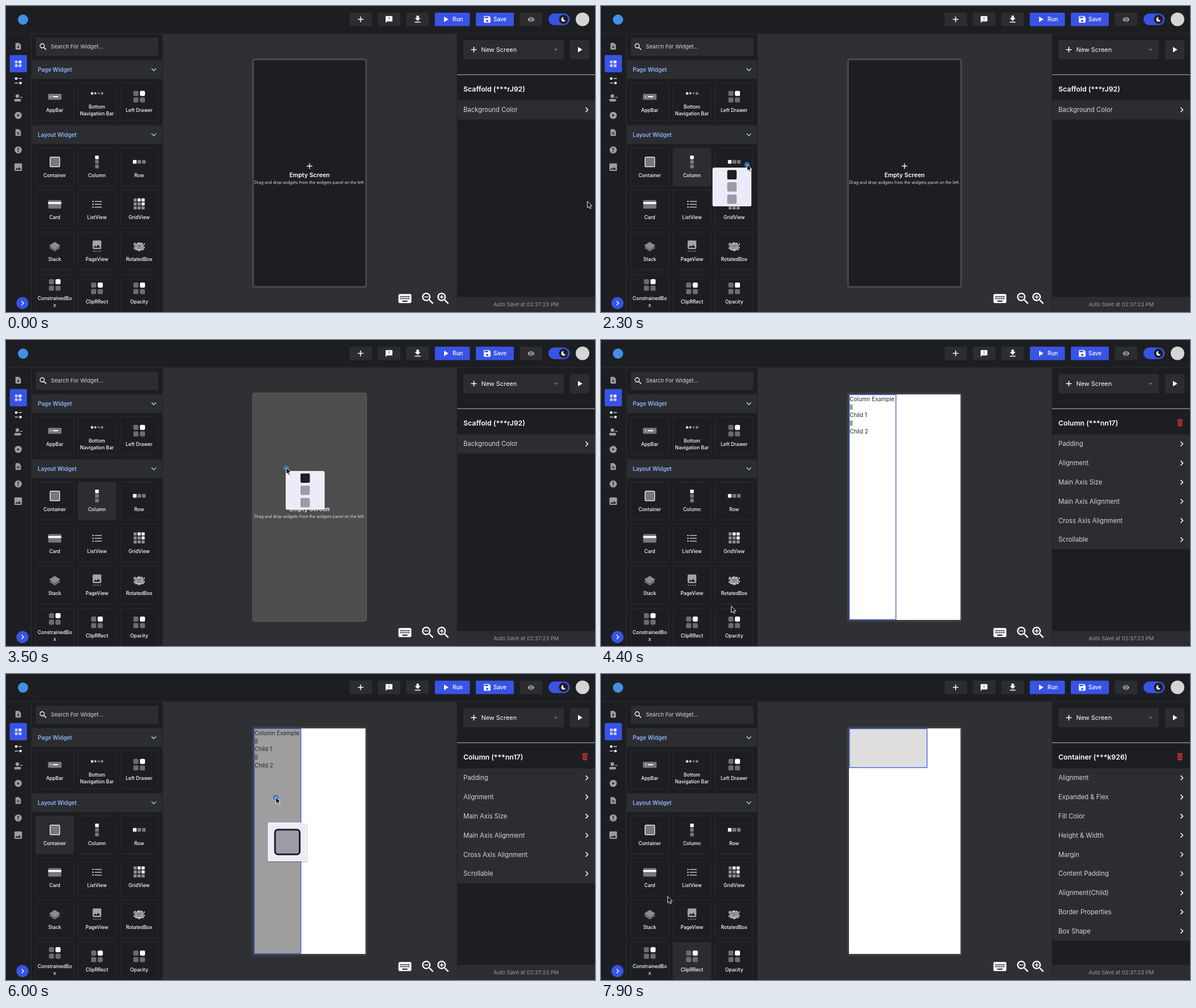
Recreate the animation shown at these times as an HTML page. Size 1038 by 540 pixels, loop 8 s.

```html
<!DOCTYPE html>
<html lang="en">
<head>
<meta charset="utf-8">
<title>Widget builder</title>
<style>
html, body { margin: 0; width: 100%; height: 100%; overflow: hidden; background: #1d1e22; }
svg { display: block; width: 1038px; height: 540px; }
text { font-family: Inter, "Open Sans", sans-serif; white-space: pre; }
</style>
</head>
<body>
<svg id="stage" viewBox="0 0 1038 540"></svg>
<script>
const DARK = '#1d1e22', PANEL = '#2c2d31', CANVAS = '#2f3034', BLUE = '#3853e6';
const GREY = '#77787c', WHITE = '#fff', PALE = '#d5d6da', LINK = '#8fb5f3';

const rect = (x, y, w, h, fill, r = 0, more = '') =>
  `<rect x="${x}" y="${y}" width="${w}" height="${h}" rx="${r}" fill="${fill}" ${more}/>`;
const circle = (x, y, r, fill) => `<circle cx="${x}" cy="${y}" r="${r}" fill="${fill}"/>`;
const line = (d, color, w = 1.5, more = '') => `<path d="${d}" fill="none" stroke="${color}" stroke-width="${w}" ${more}/>`;
const text = (s, x, mid, size, fill = WHITE, weight = 400, anchor = 'start') =>
  `<text x="${x}" y="${mid + size * .36}" font-size="${size}" fill="${fill}" font-weight="${weight}" text-anchor="${anchor}">${s.replace(/&/g, '&amp;')}</text>`;
const icon = (d, x, y, scale, fill = WHITE) =>
  `<path transform="translate(${x} ${y}) scale(${scale}) translate(-12 -12)" d="${d}" fill="${fill}" fill-rule="evenodd"/>`;
const group = (id, body) => `<g id="${id}">${body}</g>`;
const plus = (x, y, r, w = 1.5) => line(`M${x - r} ${y}h${2 * r}M${x} ${y - r}v${2 * r}`, WHITE, w);
const chevron = (x, y) => line(`M${x - 2} ${y - 4}l4 4-4 4`, WHITE, 1.5);

const ICONS = {
  save: 'M17 3H5a2 2 0 0 0-2 2v14a2 2 0 0 0 2 2h14a2 2 0 0 0 2-2V7zM12 19a3 3 0 1 1 0-6 3 3 0 0 1 0 6zM15 9H5V5h10z',
  load: 'M19 9h-4V3H9v6H5l7 7zM5 18v2h14v-2z',
  note: 'M20 2H4a2 2 0 0 0-2 2v18l4-4h14a2 2 0 0 0 2-2V4a2 2 0 0 0-2-2zM13 14h-2v-2h2zM13 10h-2V6h2z',
  eye: 'M12 4.5C7 4.5 2.7 7.6 1 12c1.7 4.4 6 7.5 11 7.5s9.3-3.1 11-7.5c-1.7-4.4-6-7.5-11-7.5zM12 17a5 5 0 1 1 0-10 5 5 0 0 1 0 10zM12 9a3 3 0 1 0 0 6 3 3 0 0 0 0-6z',
  play: 'M7 4v16l13-8z',
  find: 'M15.5 14h-.8l-.3-.3A6.5 6.5 0 1 0 13.7 14.4l.3.3v.8l5 5 1.5-1.5zM9.5 14a4.5 4.5 0 1 1 0-9 4.5 4.5 0 0 1 0 9z',
  keys: 'M20 5H4a2 2 0 0 0-2 2v10a2 2 0 0 0 2 2h16a2 2 0 0 0 2-2V7a2 2 0 0 0-2-2zM8 15h8v2H8z'
    + [5, 8, 11, 14, 17].map(x => `M${x} 8h2v2h-2zM${x} 11h2v2h-2z`).join(''),
  bin: 'M6 20a2 2 0 0 0 2 2h8a2 2 0 0 0 2-2V7H6zM20 3h-4.5l-1-1h-5l-1 1H4v2.5h16zM8.5 9v10h1V9zM11.5 9v10h1V9zM14.5 9v10h1V9z',
  image: 'M21 19V5a2 2 0 0 0-2-2H5a2 2 0 0 0-2 2v14a2 2 0 0 0 2 2h14a2 2 0 0 0 2-2zM8.5 13.5l2.5 3 3.5-4.5 4.5 6H5z',
  doc: 'M6 2a2 2 0 0 0-2 2v16a2 2 0 0 0 2 2h12a2 2 0 0 0 2-2V8l-6-6zM8 11h8v1.8H8zM8 15h8v1.8H8z',
  inbox: 'M6 2a2 2 0 0 0-2 2v16a2 2 0 0 0 2 2h12a2 2 0 0 0 2-2V8l-6-6zM11 9h2v5h3l-4 4-4-4h3z',
  star: 'M12 1l3.2 7.3 7.8.7-6 5.2 1.9 7.8-6.9-4.2L5.1 22 7 14.2 1 9l7.8-.7z'
};

// Four squares, the top right one lit.
const quad = (x, y, s, gap, dim = '#6b6c70') =>
  [0, 1, 2, 3].map(i => rect(x + (i % 2 ? gap / 2 : -s - gap / 2), y + (i > 1 ? gap / 2 : -s - gap / 2), s, s,
    i === 1 ? WHITE : dim, s * .25)).join('');

const ART = {
  AppBar: (x, y) => rect(x - 12, y - 5, 24, 10.5, GREY, 1.5) + rect(x - 3, y - 1, 9, 2, WHITE)
    + line(`M${x - 6} ${y - 2}l-2 2 2 2`, WHITE, 1),
  Bottom: (x, y) => [0, 1, 2, 3].map(i => icon(ICONS.star, x - 8.5 + i * 5.8, y, i % 3 ? .22 : .29, i < 2 ? WHITE : '#8b8c90')).join(''),
  Container: (x, y) => rect(x - 8.3, y - 8.3, 17, 17, GREY, 2, `stroke="${WHITE}" stroke-width="1.2"`),
  Column: (x, y) => [-11, -3, 5].map((d, i) => rect(x - 3.2, y + d, 6.4, 6.4, i ? GREY : WHITE, .8)).join(''),
  Row: (x, y) => [-11, -3, 5].map((d, i) => rect(x + d, y - 3.2, 6.4, 6.4, i ? GREY : WHITE, .8)).join(''),
  Card: (x, y) => rect(x - 11.5, y - 7, 23, 15, GREY, 1.5) + rect(x - 11.5, y - 3.5, 23, 3.5, WHITE),
  ListView: (x, y) => [-4.5, .5, 5.5].map(d => rect(x - 8, y + d - 1, 2, 2, WHITE) + rect(x - 4, y + d - .8, 12.5, 1.6, '#b8b9bd')).join(''),
  GridView: (x, y) => [0, 1, 2, 3, 4, 5, 6, 7, 8].map(i =>
    rect(x - 9.8 + i % 3 * 7, y - 10 + (i / 3 | 0) * 7, 5.5, 5.5, [1, 2, 5].includes(i) ? WHITE : '#8b8c90', .7)).join(''),
  Stack: (x, y) => `<path d="M${x - 10} ${y + 3}l10-6 10 6-10 6.5z" fill="#6b6c70"/><path d="M${x - 10} ${y - 1}l10-6.5 10 6.5-10 6.5z" fill="#8b8c90"/>`,
  PageView: (x, y) => icon(ICONS.image, x, y - 2.5, .85, '#a4a5a9')
    + line(`M${x - 7} ${y + 9}h14`, '#a4a5a9', 1.5, 'stroke-dasharray="2 2"'),
  RotatedBox: (x, y) => `<path d="M${x} ${y - 7}l8 4v8l-8 4.5-8-4.5v-8z" fill="#9a9b9f"/>`
    + line(`M${x - 9} ${y - 5}h18v11h-18z`, WHITE, 1.2, 'stroke-dasharray="3 3"')
    + line(`M${x - 4} ${y - 2}l4 2.5 4-2.5M${x} ${y + .5}v4`, '#55565a', 1),
  quad: (x, y) => quad(x, y, 9, 2.6)
};

const tileX = c => 52.5 + c * 74.4;
const tileY = r => r ? 250.5 + (r - 1) * 74.4 : 135.5;
const ROWS = [
  ['AppBar', 'Bottom|Navigation Bar', 'Left Drawer'],
  ['Container', 'Column', 'Row'],
  ['Card', 'ListView', 'GridView'],
  ['Stack', 'PageView', 'RotatedBox'],
  ['ConstrainedBo|x', 'ClipRRect', 'Opacity']
];

function tile(label, c, r) {
  const x = tileX(c), y = tileY(r), mid = x + 33.4, lines = label.split('|');
  const two = lines.length > 1;
  return rect(x, y, 67, 67, DARK, 2, `id="tile${r}${c}" stroke="${PANEL}"`)
    + (ART[lines[0]] || ART.quad)(mid, y + (two ? 18.5 : 24.5))
    + lines.map((s, i) => text(s, mid, y + (two ? 42 + i * 12.3 : 48), 8.5, WHITE, 500, 'middle')).join('');
}

const section = (s, y) => rect(46, y - 16.5, 229, 33, PANEL) + text(s, 56, y, 9.8, LINK, 600)
  + line(`M256.5 ${y - 2}l4 4 4-4`, LINK, 1.7);

const button = (x, w, fill = PANEL) => rect(x, 11.8, w, 23.6, fill, 2);

function topBar() {
  return rect(0, 0, 1038, 48.5, DARK) + rect(0, 48, 1038, 1.5, '#292a2e')
    + circle(30, 24, 9, '#438fe8')
    + button(605.5, 39.5) + plus(625, 23.6, 5)
    + button(655.5, 39.5) + icon(ICONS.note, 675, 23.7, .6)
    + button(705.5, 39.5) + icon(ICONS.load, 725.5, 23.5, .72)
    + button(755.7, 61.8, BLUE) + icon(ICONS.play, 775, 23.6, .6) + text('Run', 787, 23.7, 9.9, WHITE, 500)
    + button(828, 67, BLUE) + icon(ICONS.save, 848, 23.6, .66) + text('Save', 859, 23.7, 9.9, WHITE, 500)
    + button(905.5, 39.5) + icon(ICONS.eye, 925.3, 23.7, .54, '#a4a5a9')
    + rect(956, 13.3, 37.5, 20.5, BLUE, 10.2) + circle(982.5, 23.5, 8, DARK)
    + '<path d="M982.5 19.6a4 4 0 1 0 3.8 5.5a3.6 3.6 0 0 1-3.8-5.5z" fill="#fff"/>'
    + circle(1016, 23.5, 12, '#d5d5d5');
}

function rail() {
  const c = '#9c9da1';
  return rect(0, 49.5, 44, 491, DARK) + rect(44, 49.5, 1.5, 491, PANEL)
    + icon(ICONS.inbox, 21.5, 71, .6, c)
    + rect(6.5, 86.5, 30.4, 30.5, BLUE, 2) + quad(21.5, 102, 5, 1.6, '#c3cbf5')
    + circle(18, 128, 2.3, WHITE) + rect(22, 127, 6, 2, c) + circle(25.5, 136, 2.3, WHITE) + rect(15.5, 135, 6, 2, c)
    + circle(20, 159, 3.2, c) + rect(14.5, 164, 12, 4.5, c, 2) + rect(25, 160.5, 4, 1.5, c)
    + circle(21.5, 193, 6.3, c) + icon(ICONS.play, 21.5, 193, .3, DARK)
    + icon(ICONS.doc, 21.5, 223.3, .6, c)
    + circle(21.5, 254, 6.3, c) + rect(20.7, 250, 1.7, 5, DARK) + rect(20.7, 256.3, 1.7, 1.7, DARK)
    + icon(ICONS.image, 21.5, 284.3, .74, c);
}

function widgets() {
  return rect(45.5, 49.5, 230, 491, DARK)
    + rect(52.5, 56, 216, 32, PANEL, 2) + icon(ICONS.find, 65.5, 72, .68) + text('Search For Widget...', 79, 72, 9.6, PALE)
    + section('Page Widget', 112.2) + section('Layout Widget', 227)
    + ROWS.map((row, r) => row.map((s, c) => tile(s, c, r)).join('')).join('')
    + circle(29, 524.3, 10.7, BLUE) + line('M27.5 520.8l3.5 3.5-3.5 3.5', WHITE, 1.5);
}

const tofu = y => line(`M439.2 ${y - 4}h3.6v8h-3.6zl3.6 8m0-8l-3.6 8`, '#444', .7);

function phone() {
  const ink = '#26272a';
  return rect(276, 49.5, 518.5, 491, CANVAS)
    + rect(435.3, 94.3, 199.4, 401.4, DARK, 3, 'id="frame" stroke="#48494d" stroke-width="3"')
    + group('empty', plus(535, 282.5, 5, 1.3) + text('Empty Screen', 535, 298.7, 10.55, WHITE, 600, 'middle')
      + text('Drag and drop widgets from the widgets panel on the left.', 535, 311, 7.17, '#dedfe2', 400, 'middle'))
    + group('column', rect(437, 96, 196.5, 398, WHITE) + rect(437.7, 96.5, 82, 397, 'none', 0, 'id="area" stroke-width="1.4"')
      + text('Column Example', 438.3, 104, 9.95, ink) + tofu(118.3) + text('Child 1', 438.3, 132.5, 9.8, ink)
      + tofu(146.8) + text('Child 2', 438.3, 161, 9.8, ink))
    + group('box', rect(437, 96, 196.5, 398, WHITE) + rect(437.8, 96.6, 136.8, 68.6, '#dedede', 0, 'stroke="#4a63dc" stroke-width="1.4"'))
    + icon(ICONS.keys, 703, 516.3, 1.14)
    + icon(ICONS.find, 743.6, 516.3, 1.15) + rect(737.3, 512.7, 7, 1.6, WHITE)
    + icon(ICONS.find, 770.6, 516.3, 1.15) + rect(764.3, 512.7, 7, 1.6, WHITE) + rect(767, 510, 1.6, 7, WHITE);
}

function props(id, title, names, bin = true) {
  const step = 33.8;
  return group(id, text(title, 806, 146.3, 12.35, WHITE, 600)
    + (bin ? icon(ICONS.bin, 1020.3, 145.8, .64, '#c6332f') : '')
    + rect(795.5, 166.5, 243, step * names.length, PANEL)
    + names.map((s, i) => text(s, 806, 183.3 + i * step, 11.25, PALE) + chevron(1023.5, 183.3 + i * step)).join(''));
}

function rightPanel() {
  return rect(795, 49.5, 243, 491, DARK)
    + rect(806, 60, 177, 34, PANEL, 2) + plus(824.5, 77, 5) + text('New Screen', 837.5, 77, 10.9, WHITE)
    + '<path d="M965 75.5h7.5l-3.7 4z" fill="#66676b"/>'
    + rect(994, 60, 34, 34, PANEL, 2) + icon(ICONS.play, 1011, 77, .6)
    + rect(795, 120.7, 243, 1.2, '#a2a3a6')
    + props('pScaffold', 'Scaffold (***rJ92)', ['Background Color'], false)
    + props('pColumn', 'Column (***nn17)', ['Padding', 'Alignment', 'Main Axis Size', 'Main Axis Alignment', 'Cross Axis Alignment', 'Scrollable'])
    + props('pBox', 'Container (***k926)', ['Alignment', 'Expanded & Flex', 'Fill Color', 'Height & Width', 'Margin',
      'Content Padding', 'Alignment(Child)', 'Border Properties', 'Box Shape'])
    + rect(795, 513.3, 243, 27, PANEL) + text('Auto Save at 02:37:23 PM', 916.7, 526.5, 9.4, '#9b9ca0', 400, 'middle');
}

function overlay() {
  return group('drag', rect(1.2, 1.8, 68, 68, '#000', 2, 'opacity=".22"')
      + rect(.5, .5, 67, 67, '#ebebf9', 2, 'stroke="#fff" stroke-width="1.4"')
      + group('dragColumn', [4, 25.7, 47.4].map((y, i) => rect(25.7, y, 16.5, 16.5, i ? '#9b9ca8' : DARK, 2)).join(''))
      + group('dragBox', rect(12.3, 12.3, 43.5, 43.5, '#9b9ca8', 5, `stroke="${DARK}" stroke-width="3"`)))
    + group('cursor', '<circle id="press" cx=".3" cy="0" r="5" fill="#2a7fd0" opacity=".8"/>'
      + '<path d="M.5-.5v11.5l2.7-2.4 2 4.1 1.9-.8-1.9-4.1h3.7z" fill="#111" stroke="#fff" stroke-width=".9"/>');
}

document.getElementById('stage').innerHTML = phone() + topBar() + rail() + widgets() + rightPanel() + overlay();
const el = id => document.getElementById(id);
const show = (id, on) => el(id).setAttribute('display', on ? 'inline' : 'none');
const move = (id, x, y) => el(id).setAttribute('transform', `translate(${x.toFixed(2)} ${y.toFixed(2)})`);

// Pointer path: time, x, y
const PATH = [
  [0, 1024, 345], [300, 1022, 345], [900, 981, 340], [1350, 560, 300], [1750, 164, 278], [1950, 164, 278],
  [2150, 197, 280], [2300, 257, 280], [2850, 455, 244], [3300, 493.5, 226], [3750, 493.5, 226],
  [4100, 340, 390], [4400, 229, 470], [4950, 88, 288], [5250, 88, 288], [5550, 280, 300],
  [5850, 462, 257], [6000, 475, 218], [6300, 479, 217], [6800, 479, 217],
  [7000, 360, 380], [7200, 207, 486], [7450, 160, 488], [7900, 117, 393], [8000, 114, 385]
];

// Cubic Hermite through the path, flat at holds.
function pointer(t) {
  let i = 0;
  while (i < PATH.length - 2 && PATH[i + 1][0] <= t) i++;
  const a = PATH[i], b = PATH[i + 1], d = b[0] - a[0], u = Math.min(1, (t - a[0]) / d);
  const still = (p, q) => p[1] === q[1] && p[2] === q[2];
  const slope = (j, k) => {
    const p = PATH[j - 1], q = PATH[j], n = PATH[j + 1];
    return !p || !n || still(p, q) || still(q, n) ? 0 : (n[k] - p[k]) / (n[0] - p[0]);
  };
  return [1, 2].map(k => {
    const v = 1 - u;
    return v * v * (1 + 2 * u) * a[k] + u * u * (3 - 2 * u) * b[k]
      + d * u * v * (v * slope(i, k) - u * slope(i + 1, k));
  });
}

const within = (t, a, b) => t >= a && t < b;
const HOVERS = [[1600, 1700, '12'], [1700, 4100, '11'], [4900, 7500, '10'], [7500, 8000, '41']];
const LAG = 150;

function draw(t) {
  const hasColumn = within(t, 4100, 7500), hasBox = t >= 7500;
  const first = within(t, 2100, 4100), second = within(t, 5400, 7500);
  const over = within(t, 2900, 4100), overColumn = within(t, 5800, 7500);

  show('empty', t < 4100);
  show('column', hasColumn);
  show('box', hasBox);
  show('pScaffold', t < 4100);
  show('pColumn', hasColumn);
  show('pBox', hasBox);
  el('frame').setAttribute('fill', over ? '#4d4d4d' : DARK);
  el('frame').setAttribute('stroke', over ? '#535355' : t < 4100 ? '#48494d' : '#404145');
  el('area').setAttribute('fill', overColumn ? '#9e9e9e' : 'none');
  el('area').setAttribute('stroke', t >= 6600 ? '#4c9a50' : '#4a63dc');

  const hover = HOVERS.find(([a, b]) => within(t, a, b));
  ROWS.forEach((row, r) => row.forEach((s, c) =>
    el(`tile${r}${c}`).setAttribute('fill', hover && hover[2] === `${r}${c}` ? PANEL : DARK)));

  show('drag', first || second);
  show('dragColumn', first);
  show('dragBox', second);
  const hold = first ? 3700 : 6800;
  const [bx, by] = pointer(Math.min(t - LAG, hold));
  move('drag', bx - .2, by + 5.4);

  const [x, y] = pointer(t);
  move('cursor', x, y);
  show('press', within(t, 1900, 3800) || within(t, 5200, 6800));
}

function tick(now) {
  draw(Math.floor(now % 8000 / 100) * 100);
  requestAnimationFrame(tick);
}
draw(0);
requestAnimationFrame(tick);
</script>
</body>
</html>
```
